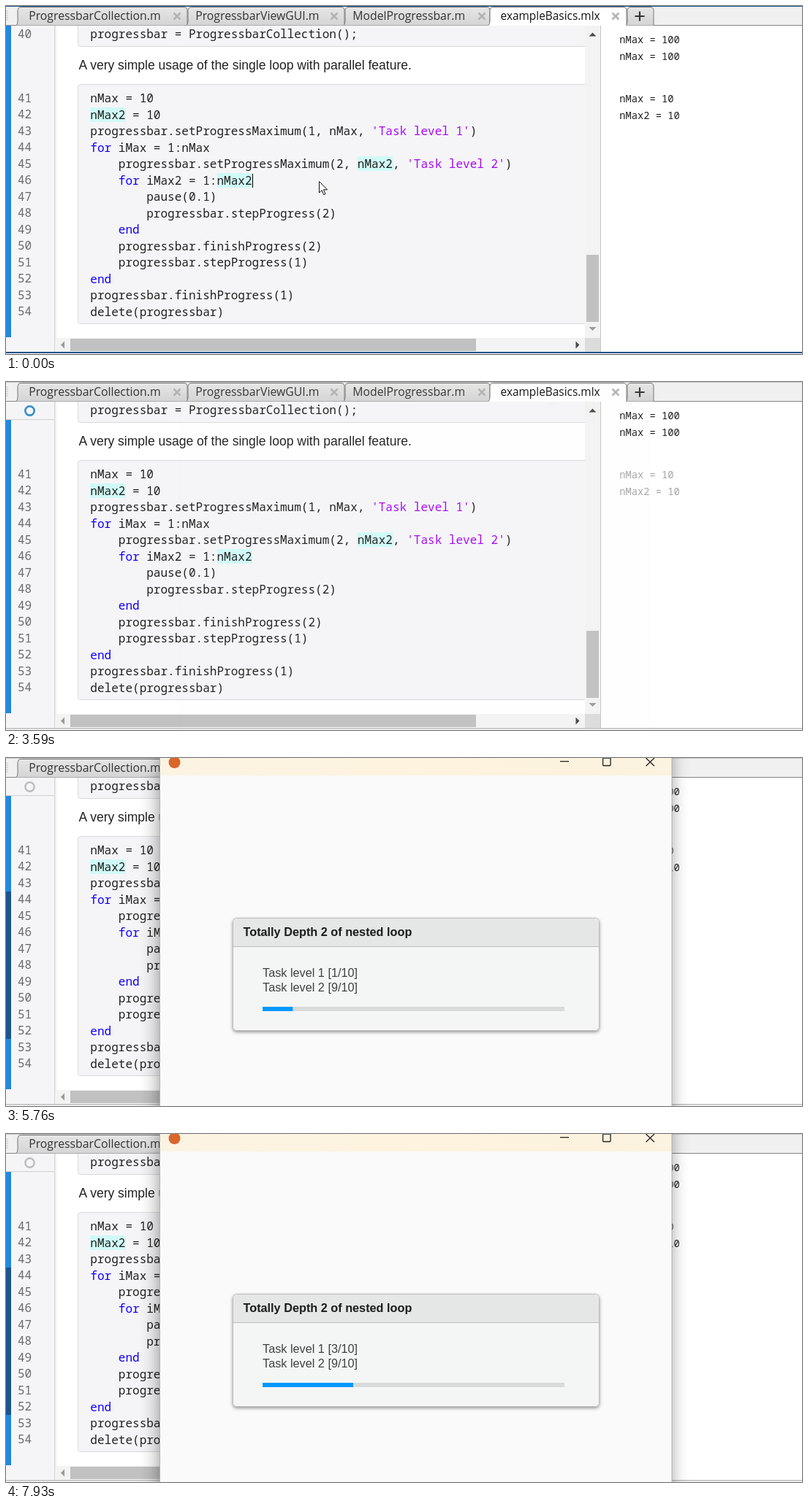
An HTML page for the animation above (8000 ms loop, 1089x477 px).

```html
<!DOCTYPE html>
<html lang="en">
<head>
<meta charset="utf-8">
<title>Nested progress</title>
<style>
  html, body { margin: 0; width: 100%; height: 100%; overflow: hidden; background: #fff; }
  svg { display: block; width: 1089px; height: 477px; }
  text { white-space: pre; fill: #212121; }
  .code { font: 16.04px "Noto Sans Mono", "DejaVu Sans Mono", monospace; }
  .num { fill: #6b6b6b; }
  .out { font-size: 13.75px; }
  .tab { font: 15.8px "Open Sans", "Noto Sans", sans-serif; fill: #333; }
  .tab.active { font-size: 15.4px; fill: #111; }
  .note { font: 17.5px "Liberation Sans", Arial, sans-serif; }
  .dialog { font: 16.25px "Liberation Sans", Arial, sans-serif; fill: #404040; }
  .dialog.head { font-weight: bold; fill: #1c1c1c; }
  .kw { fill: #0e00ff; }
  .str { fill: #a709f5; }
</style>
</head>
<body>
<svg viewBox="0 0 1089 477" xmlns="http://www.w3.org/2000/svg">
  <defs>
    <linearGradient id="tabFill" x1="0" y1="0" x2="0" y2="1">
      <stop offset="0" stop-color="#e6e6e6"/><stop offset="1" stop-color="#d4d4d4"/>
    </linearGradient>
    <linearGradient id="titleFill">
      <stop offset="0" stop-color="#fbf3e3"/><stop offset=".5" stop-color="#fdf3de"/><stop offset="1" stop-color="#fbf2df"/>
    </linearGradient>
    <linearGradient id="edge">
      <stop offset="0" stop-color="#000" stop-opacity="0"/><stop offset="1" stop-color="#000" stop-opacity=".06"/>
    </linearGradient>
    <linearGradient id="shine" gradientUnits="userSpaceOnUse" x1="-75" x2="75" y1="0" y2="0">
      <stop offset="0" stop-color="#5cbcff" stop-opacity="0"/>
      <stop offset=".5" stop-color="#5cbcff"/>
      <stop offset="1" stop-color="#5cbcff" stop-opacity="0"/>
    </linearGradient>
    <filter id="winShadow" x="-10%" y="-10%" width="120%" height="120%">
      <feDropShadow dx="0" dy="6" stdDeviation="11" flood-opacity=".36"/>
    </filter>
    <filter id="boxShadow" x="-5%" y="-10%" width="110%" height="125%">
      <feDropShadow dx="0" dy="2" stdDeviation="2" flood-opacity=".4"/>
    </filter>
    <clipPath id="editorClip"><rect x="67" y="27" width="725" height="428"/></clipPath>
    <clipPath id="fillClip"><rect id="fillRect" x="351" y="341" width="0" height="6"/></clipPath>
  </defs>

  <rect width="1089" height="477" fill="#fff"/>
  <rect width="1089" height="27" fill="#f0f0f0"/>
  <path d="M0 7h3M0 10h3M0 13h3M0 16h3M0 19h3" stroke="#c4c4c4"/>
  <path d="M0 26.5H1089" stroke="#858585"/>
  <g id="tabs"></g>

  <rect x="0" y="27" width="66" height="447" fill="#f5f5f7"/>
  <rect x="0" y="27" width="7" height="427" fill="#1f8ae0"/>
  <rect id="running" x="0" y="183" width="7" height="202" fill="#1c558f"/>
  <path d="M66.5 27V474" stroke="#d2d2d2"/>
  <path d="M68 27V455" stroke="#f0f0f0" stroke-width="2"/>
  <g clip-path="url(#editorClip)" fill="#f5f5f7" stroke="#d9d9d9">
    <rect x="98.5" y="10.5" width="720" height="45" rx="4"/>
    <rect x="98.5" y="107.5" width="720" height="328" rx="4"/>
  </g>
  <g fill="#d0faf6">
    <rect x="115" y="139" width="49" height="20"/>
    <rect x="481" y="206" width="49" height="20"/>
    <rect x="289" y="229" width="48" height="20"/>
  </g>
  <text class="note" x="99.6" y="87">A very simple usage of the single loop with parallel feature.</text>
  <g id="code" class="code"></g>
  <g id="status">
    <rect x="0" y="27" width="66" height="24" fill="#f5f5f7"/>
    <path d="M0 51.5H66" stroke="#d0d0d0"/>
    <circle cx="32.5" cy="39.5" r="6.2" fill="none" stroke="#bdbdbd" stroke-width="2.4"/>
    <circle id="arc" cx="32.5" cy="39.5" r="6.2" fill="none" stroke="#2f8fd0" stroke-width="2.4"
      pathLength="100" transform="rotate(-90 32.5 39.5)"/>
  </g>
  <path id="caret" d="M337.5 230V249" stroke="#000"/>

  <rect x="792" y="27" width="21" height="428" fill="#f3f3f3"/>
  <rect x="67" y="455" width="725" height="19" fill="#f3f3f3"/>
  <rect x="792" y="455" width="21" height="19" fill="#dcdcdc"/>
  <rect x="794" y="341" width="17" height="92" fill="#c1c1c1"/>
  <rect x="88" y="456" width="555" height="17" fill="#c1c1c1"/>
  <path d="M797.5 41.5l5-5 5 5zM779.5 459.5l5 5-5 5z" fill="#484848"/>
  <path d="M797.5 440l5 5 5-5zM80 459.5l-5 5 5 5z" fill="#9a9a9a"/>
  <path d="M813.5 27V474" stroke="#c6c6c6"/>
  <g id="output" class="code"></g>
  <g id="frame" stroke-width="2"><path d="M0 475H1089"/><path d="M0 .5H1089" stroke-width="1"/></g>

  <g id="window">
    <rect x="210.5" y="-22" width="700.5" height="638" rx="7" fill="#fafafa" filter="url(#winShadow)"/>
    <rect x="180" y="24" width="30" height="453" fill="url(#edge)"/>
    <path d="M210.5 24V-15q0-7 7-7H904q7 0 7 7V24z" fill="url(#titleFill)"/>
    <path d="M210.5 -15V616M911 -15V616" stroke="#a5a5a5" stroke-width=".8"/>
    <circle cx="230.5" cy="6" r="8" fill="#d9662b"/>
    <g fill="none" stroke="#222" stroke-width="1.3">
      <path d="M758 4.7H770M875.5 0L887 11M887 0L875.5 11"/>
      <rect x="816.6" y="0" width="10.5" height="10.5" rx="1.2"/>
    </g>
    <g id="dialog">
      <g filter="url(#boxShadow)">
        <rect x="310.5" y="219.5" width="501" height="154" rx="5" fill="#f4f6f6" stroke="#bcbcbc"/>
      </g>
      <path d="M311 258V224.5q0-4.5 4.5-4.5H806.5q4.5 0 4.5 4.5V258z" fill="#e5e7e7"/>
      <path d="M311 258.5H811" stroke="#bdbdbd"/>
      <text class="dialog head" x="324.5" y="244">Totally Depth 2 of nested loop</text>
      <text class="dialog" id="level1" x="351" y="300"></text>
      <text class="dialog" id="level2" x="351" y="320"></text>
      <rect x="351" y="341" width="413" height="6" fill="#d9dada"/>
      <g clip-path="url(#fillClip)">
        <rect x="351" y="341" width="413" height="6" fill="#0099ff"/>
        <rect id="glow" x="-75" y="341" width="150" height="6" fill="url(#shine)"/>
      </g>
    </g>
  </g>

  <path id="mouse" d="M.5 .5V16l3.6-3.4 2.6 6 2.3-1-2.6-5.8H11.5z" fill="#fff" stroke="#111"/>
</svg>
<script>
const $ = id => document.getElementById(id);
const LOOP = 8000;
const clamp = x => Math.max(0, Math.min(1, x));
const show = (id, on) => $(id).setAttribute('display', on ? 'inline' : 'none');

// Tabs: left edge, right edge, label x, label, close mark x
const tabs = [
  [14, 248, 31.2, 'ProgressbarCollection.m', 234],
  [247, 463, 259.2, 'ProgressbarViewGUI.m', 449],
  [462, 662, 474.2, 'ModelProgressbar.m', 651],
  [848, 886, 0, '', 0],
  [660, 849, 676.6, 'exampleBasics.mlx', 834]
];
$('tabs').innerHTML = tabs.map(([l, r, x, label, close], i) => {
  const active = i === 4;
  const shape = `M${l} 26.5Q${l + 2} 25 ${l + 2} 21V6.5Q${l + 2} 1.5 ${l + 7} 1.5H${r - 5}Q${r} 1.5 ${r} 6V26.5`;
  const cross = `M${close - 4.5} 9.5l9 9m0-9l-9 9`;
  return `<path d="${shape}" fill="${active ? '#fff' : 'url(#tabFill)'}" stroke="#777"/>` +
    (active ? `<path d="M${l + 1} 26.5H${r - 1}" stroke="#fff"/>` : '') +
    (label
      ? `<text class="tab${active ? ' active' : ''}" x="${x}" y="19">${label}</text>
         <path d="${cross}" stroke="#b3b3b3" stroke-width="2.5"/>`
      : '<path d="M860.5 14H873.5M867 7.5V20.5" stroke="#333" stroke-width="2.2"/>');
}).join('');

const lines = [
  'nMax = 10',
  'nMax2 = 10',
  "progressbar.setProgressMaximum(1, nMax, 'Task level 1')",
  'for iMax = 1:nMax',
  "    progressbar.setProgressMaximum(2, nMax2, 'Task level 2')",
  '    for iMax2 = 1:nMax2',
  '        pause(0.1)',
  '        progressbar.stepProgress(2)',
  '    end',
  '    progressbar.finishProgress(2)',
  '    progressbar.stepProgress(1)',
  'end',
  'progressbar.finishProgress(1)',
  'delete(progressbar)'
];
const paint = s => s
  .replace(/'[^']*'/g, m => `<tspan class='str'>${m}</tspan>`)
  .replace(/\b(for|end)\b/g, '<tspan class="kw">$1</tspan>');
const codeLine = (no, y, s) =>
  `<text class="num" x="16" y="${y - .5}">${no}</text><text x="115.3" y="${y}">${paint(s)}</text>`;
$('code').innerHTML = codeLine(40, 44, 'progressbar = ProgressbarCollection();') +
  lines.map((s, i) => codeLine(41 + i, 132 + i * 22.5, s)).join('');

const outLine = (s, y) => `<text class="out" x="839.3" y="${y}">${s}</text>`;
$('output').innerHTML = outLine('nMax = 100', 51) + outLine('nMax = 100', 74) +
  `<g id="fresh">${outLine('nMax = 10', 132)}${outLine('nMax2 = 10', 155)}</g>`;

// Pointer: time, x, y
const mousePath = [[0, 428, 240], [70, 440, 212], [140, 449, 150], [200, 395, 72], [270, 271, 4]];
const RUN = 940, OPEN = 3540, TASK = 3537, STEP = 112;

function drawMouse(t) {
  const [, x, y] = mousePath.filter(p => p[0] <= t).pop();
  $('mouse').setAttribute('transform', `translate(${x} ${y})`);
  show('mouse', t < 340);
}

function drawEditor(t) {
  const opened = t >= 3700;
  const blinkOff = t >= RUN && Math.floor((t - RUN) / 500) % 2 === 0;
  show('status', t >= RUN);
  show('caret', t < 3300 && !blinkOff);
  show('running', opened);
  $('fresh').setAttribute('opacity', t >= RUN && !opened ? .4 : 1);

  const focused = t < 3300 || (t >= 6100 && t < 6600);
  $('frame').setAttribute('stroke', focused ? '#1d4f87' : '#c9c9c9');

  // Ring fills clockwise, then empties clockwise
  const phase = (t - 3590 + 4500) % 900;
  const head = phase < 740 ? 100 : (phase - 740) / 1.6;
  const tail = phase < 740 ? 100 * clamp(phase / 360) : 0;
  $('arc').setAttribute('stroke-dasharray', `0 ${tail} ${head - tail} 200`);
  show('arc', t >= RUN && head > tail);
}

function drawWindow(t) {
  const p = clamp((t - OPEN) / 310);
  const scale = 1 - .15 * (1 - p) ** 3;
  $('window').setAttribute('transform', `translate(561 297) scale(${scale}) translate(-561 -297)`);
  $('window').setAttribute('opacity', clamp((t - 3588) / 120));
  show('dialog', t >= 3650);

  const n = Math.max(0, Math.floor((t - TASK) / STEP));
  const outer = Math.floor(n / 10);
  $('level1').textContent = `Task level 1 [${outer}/10]`;
  $('level2').textContent = `Task level 2 [${n % 10}/10]`;

  const since = t - TASK - outer * 10 * STEP;
  const width = outer ? 41.3 * (outer - 1 + clamp(since / 235)) : 0;
  $('fillRect').setAttribute('width', width);
  const sweep = (since - 400) / 400;
  show('glow', outer && sweep > 0 && sweep < 1);
  $('glow').setAttribute('transform', `translate(${351 - 60 + sweep * (width + 120)} 0)`);
}

function draw() {
  const t = performance.now() % LOOP;
  drawMouse(t);
  drawEditor(t);
  drawWindow(t);
  requestAnimationFrame(draw);
}
draw();
</script>
</body>
</html>
```
